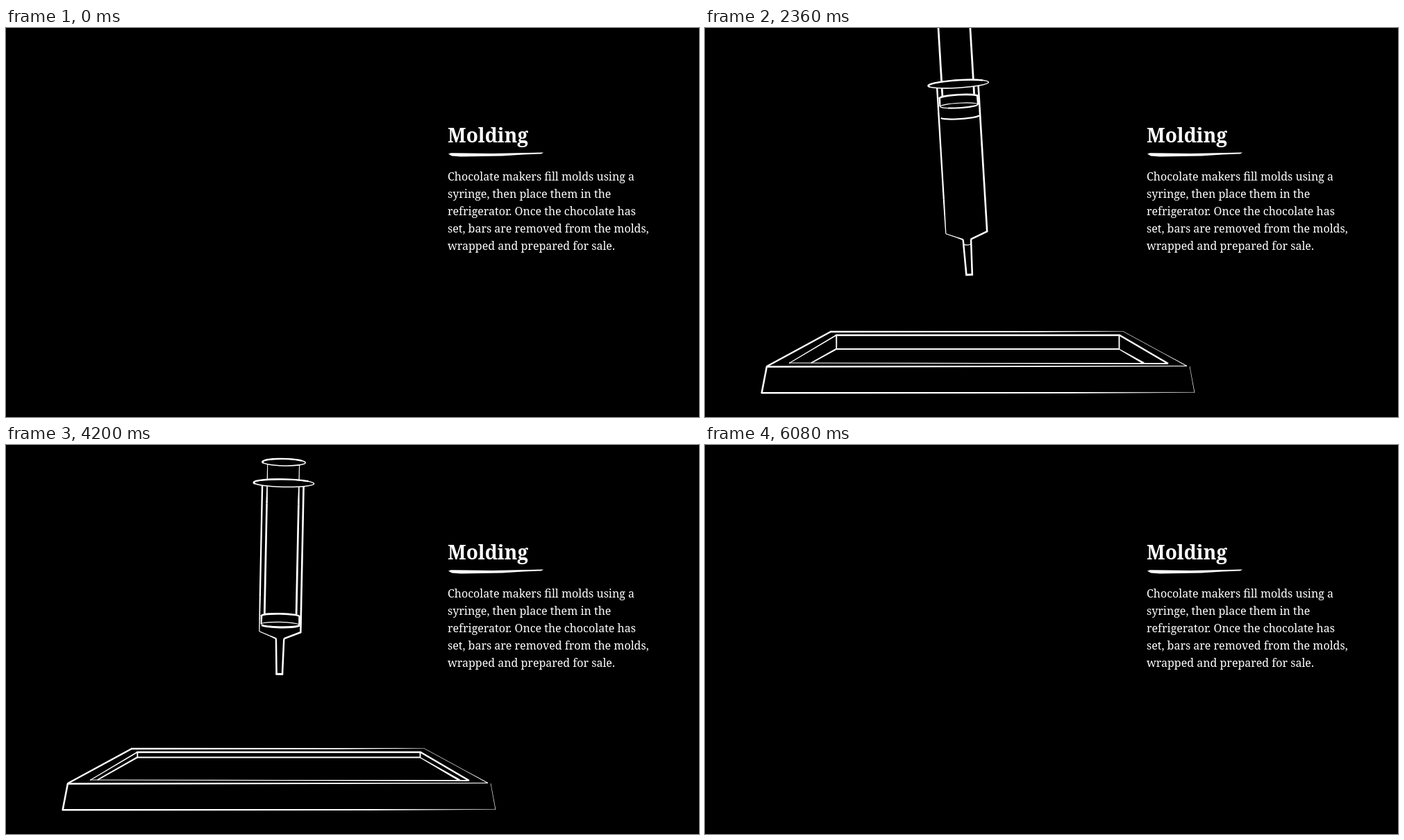
An HTML page with a canvas for the animation above (7040 ms loop, 998 by 561 pixels).

```html
<!DOCTYPE html>
<html lang="en">
<head>
<meta charset="utf-8">
<title>Molding</title>
<style>
  html, body { margin: 0; width: 100%; height: 100%; overflow: hidden; background: #000; }
  canvas, svg { position: absolute; left: 0; top: 0; display: block; }
  text { font: 16px "Noto Serif", serif; fill: #fff; }
  .title { font-size: 28px; font-weight: 600; }
</style>
</head>
<body>
<canvas id="stage" width="998" height="561"></canvas>
<svg width="998" height="561">
  <text class="title" x="636" y="165">Molding</text>
  <path fill="#fff" d="M637 181.5 L641 180.3 L700 181 L774 179.6 L771 181.4 L745 182.6 L715 184.4 L655 185.6 L642 184.4 Z"/>
  <text x="636" y="219.5">Chocolate makers fill molds using a</text>
  <text x="636" y="244.5">syringe, then place them in the</text>
  <text x="636" y="269.5">refrigerator. Once the chocolate has</text>
  <text x="636" y="294.5">set, bars are removed from the molds,</text>
  <text x="636" y="319.5">wrapped and prepared for sale.</text>
</svg>
<script>
const ctx = document.getElementById('stage').getContext('2d');
const LOOP = 7040, STEP = 40;

// Value at time t between [time, value] keys, eased in and out.
function keys(t, ...list) {
  if (t <= list[0][0]) return list[0][1];
  for (let i = 1; i < list.length; i++) {
    const [t0, a] = list[i - 1], [t1, b] = list[i];
    if (t < t1) return a + (b - a) * (0.5 - 0.5 * Math.cos(Math.PI * (t - t0) / (t1 - t0)));
  }
  return list[list.length - 1][1];
}

// Brush line through x, y, width triples.
function brush(...p) {
  for (let i = 0; i + 5 < p.length; i += 3) {
    const [x, y, w, u, v, z] = p.slice(i, i + 6);
    const len = Math.hypot(u - x, v - y) || 1;
    const nx = (y - v) / len / 2, ny = (u - x) / len / 2;
    ctx.beginPath();
    ctx.moveTo(x + nx * w, y + ny * w);
    ctx.lineTo(u + nx * z, v + ny * z);
    ctx.lineTo(u - nx * z, v - ny * z);
    ctx.lineTo(x - nx * w, y - ny * w);
    ctx.fill();
  }
}

function oval(x, y, rx, ry, width, from = 0, to = Math.PI * 2) {
  ctx.lineWidth = width;
  ctx.beginPath();
  ctx.ellipse(x, y, rx, ry, 0, from, to);
  ctx.stroke();
}

function disc(x, y, rx, ry) {
  ctx.fillStyle = '#000';
  ctx.beginPath();
  ctx.ellipse(x, y, rx, ry, 0, 0, Math.PI * 2);
  ctx.fill();
  ctx.fillStyle = '#fff';
  oval(x, y, rx, ry, 1.6);
  oval(x, y, rx, ry, 2.4, Math.PI * 0.9, Math.PI * 1.8);
}

function drawTray(t) {
  const shift = t < 3000
    ? keys(t, [120, 920], [680, -76], [880, 23], [960, 0])
    : keys(t, [5440, 0], [5640, 83], [6080, -720]);
  const level = keys(t, [3080, 463], [4000, 450.5]);
  const spread = (463 - level) * 1.7;
  ctx.save();
  ctx.translate(shift, 0);
  // rim
  brush(89, 488, 2.5, 181, 438, 2.5);
  brush(180, 438, 2.5, 480, 437.8, 1.8, 560, 437.5, 1, 602, 437.5, 0.6);
  brush(602, 437.5, 0.6, 660, 469, 0.8, 694, 487.5, 1.3);
  brush(88, 488.5, 2.5, 450, 488, 2, 694, 487.5, 1.1);
  // front
  brush(89, 488, 2.5, 81.5, 527, 2.5);
  brush(81, 526.3, 2.5, 520, 526, 2, 640, 525.7, 1, 705, 525.5, 0.6);
  brush(698, 488, 0.6, 705, 526, 0.7);
  // opening
  brush(188, 443, 2.4, 598, 443, 2.4);
  brush(189, 443, 1.8, 121, 483.5, 1.1);
  brush(597, 443, 2.4, 667, 484, 2.4);
  brush(121, 483, 1.1, 400, 483.6, 1.3, 667, 484, 2.2);
  // floor or chocolate surface
  brush(189.3, 443, 2, 189.3, level, 1.8);
  brush(596.5, 443, 2, 596.5, level, 1.8);
  brush(189, level, 2, 597, level, 2.2);
  brush(189, level, 2.2, 153 - spread, 483, 1.8);
  brush(596, level, 1.4, 632 + spread, 483.5, 3);
  ctx.restore();
}

function drawStream(t, tip) {
  const end = keys(t, [2960, tip], [3080, 471]);
  const start = keys(t, [3680, tip], [3840, 471]);
  if (end - start < 1) return;
  ctx.fillStyle = '#000';
  ctx.fillRect(390, start, 7, end - start);
  ctx.fillStyle = '#fff';
  brush(390.5, start, 2, 390.5, end, 1.6);
  brush(396.5, start, 2, 396.5, end, 1.6);
}

function drawSyringe(t) {
  if (t < 1720 || t >= 4840) return;
  const push = keys(t, [2640, 16], [3620, 189]);
  const leave = Math.max(0, (t - 4160) / 680) ** 1.25;
  const x = keys(t, [1680, 153.5], [2480, 393.5]) + leave * 2;
  const y = keys(t, [1680, -5], [2200, 373], [2400, 354], [2520, 367], [3200, 367], [3640, 340.5]) - leave * 350;
  const tilt = keys(t, [1680, -63], [2480, 0], [4160, 0], [4460, 27], [4840, 12]);
  drawStream(t, y);

  const flange = -275.5, top = flange + push, bottom = top + 15;
  const surface = Math.max(flange + 50, top + 19);
  const handle = top - 219;
  ctx.save();
  ctx.translate(x, y);
  ctx.rotate(tilt * Math.PI / 180);
  // plunger rod and handle
  brush(-23, handle + 3, 1, -23, handle + 30, 1.4, -23, handle + 60, 2.6, -23, top, 2.8);
  brush(22.8, handle + 3, 1, 22.8, handle + 30, 1.4, 22.8, handle + 60, 2.6, 22.8, top, 2.8);
  disc(0.5, handle, 31, 5);
  // piston
  oval(0, top + 3, 27.5, 3.5, 2.6, Math.PI, Math.PI * 2);
  brush(-27.3, top + 2, 2.6, -27.3, bottom, 2);
  brush(27.3, top + 2, 2.6, 27.3, bottom, 2.4);
  oval(0, bottom, 27, 3.5, 1.2);
  oval(0, bottom, 27, 3.5, 2, 0, Math.PI * 0.7);
  oval(0, surface - 3.5, 28.5, 4, 2.2, 0.15, Math.PI * 0.9);
  // barrel
  brush(-30, flange + 3, 2.4, -30, -110, 2.2, -30, -61, 1.2);
  brush(29.5, flange + 3, 2.6, 29.5, -60, 2.6);
  brush(-30, -61, 1.1, -15, -55, 1.4, -5.5, -51, 2.2);
  brush(30, -61, 2.6, 5.5, -51, 2.4);
  disc(1, flange, 43.5, 5.5);
  // nozzle
  brush(-5.7, -51, 2.4, -4, 0, 2.6);
  brush(5.7, -51, 2.4, 4.4, 0, 2.6);
  brush(-5.2, 0, 3, 5.6, 0, 3);
  const front = keys(t, [2760, -45], [2960, 0]);
  if (front < 0) oval(0, front, 5, 2, 1.3, 0, Math.PI);
  ctx.restore();
}

function frame(now) {
  const t = Math.floor(now % LOOP / STEP) * STEP;
  ctx.clearRect(0, 0, 998, 561);
  ctx.fillStyle = ctx.strokeStyle = '#fff';
  if (t >= 160 && t < 6080) drawTray(t);
  drawSyringe(t);
  requestAnimationFrame(frame);
}
requestAnimationFrame(frame);
</script>
</body>
</html>
```
